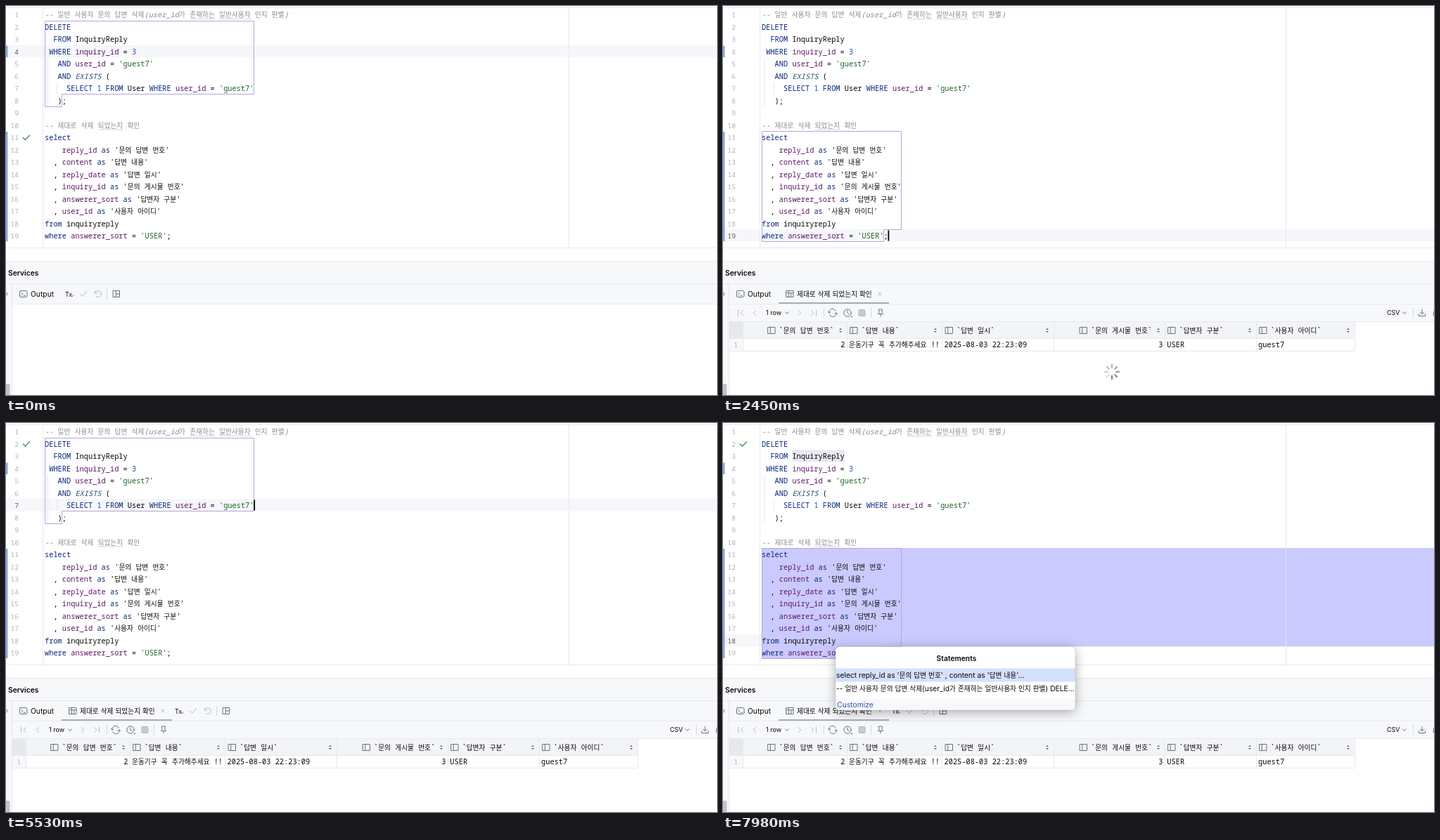
An HTML page for the animation above (8000 ms loop, 1011 by 554 pixels).

```html
<!DOCTYPE html>
<html lang="ko">
<head>
<meta charset="utf-8">
<title>SQL console</title>
<style>
html, body { margin: 0; width: 100%; height: 100%; overflow: hidden; background: #fff; }
svg { display: block; width: 1011px; height: 554px; }
text { white-space: pre; fill: #08080a; }
.mono { font: 500 10.33px "Noto Sans Mono", "DejaVu Sans Mono", monospace; }
.ui { font: 10.3px Inter, "Open Sans", sans-serif; }
.bold { font-weight: 600; }
.small { font-size: 9px; }
.h { font: 9.7px "Noto Sans CJK KR", "Noto Sans CJK", sans-serif; }
.num { font-weight: 400; font-size: 9.7px; text-anchor: end; fill: #aeb3c0; }
.num.now { fill: #565a68; }
.end { text-anchor: end; }
.mid { text-anchor: middle; }
.link { fill: #3058ae; }
.kw { fill: #06267c; }
.col { fill: #5e1768; }
.str { fill: #1f6428; }
.lit { fill: #2148bd; }
.fn { fill: #284d66; font-style: italic; }
.com { fill: #8c8c8c; font-style: italic; }
.line { stroke: #e8e9ed; fill: none; }
.panel { fill: #f7f8fa; }
.sel { fill: #cacaff; }
.box { fill: none; stroke: #b4a6d8; }
.typo { stroke: #a9a9ad; stroke-dasharray: 1.2 1.2; }
.icon { fill: none; stroke: #6c707e; stroke-linecap: round; stroke-linejoin: round; }
.off { stroke: #b4b8c2; }
.tick { fill: none; stroke: #4a9a50; stroke-width: 1.5; stroke-linecap: round; stroke-linejoin: round; }
.pop { filter: drop-shadow(0 3px 8px rgba(0, 0, 0, .32)); }
</style>
</head>
<body>
<svg id="stage" viewBox="0 0 1011 554" xmlns="http://www.w3.org/2000/svg"></svg>
<script>
const LOOP = 8000, STEP = 70, ROW = 17.5, CH = 6.2, LEFT = 55;
const USER = "guest7";

const sql = [
  "-- 일반 사용자 문의 답변 삭제(user_id가 존재하는 일반사용자 인지 판별)",
  "DELETE",
  "  FROM InquiryReply",
  " WHERE inquiry_id = 3",
  `   AND user_id = '${USER}'`,
  "   AND EXISTS (",
  `     SELECT 1 FROM User WHERE user_id = '${USER}'`,
  "   );",
  "",
  "-- 제대로 삭제 되었는지 확인",
  "select",
  "    reply_id as '문의 답변 번호'",
  "  , content as '답변 내용'",
  "  , reply_date as '답변 일시'",
  "  , inquiry_id as '문의 게시물 번호'",
  "  , answerer_sort as '답변자 구분'",
  "  , user_id as '사용자 아이디'",
  "from inquiryreply",
  "where answerer_sort = 'USER';"
];

const midY = n => 12.5 + ROW * (n - 1);
const topY = n => Math.floor(midY(n) - ROW / 2);
const endY = n => Math.floor(midY(n) + ROW / 2 - .5);
const hangul = s => s.replace(/[가-힣]+/g, m => `<tspan class="h">${m}</tspan>`);
const text = (x, y, s, cls) => `<text x="${x}" y="${y}" class="${cls}">${hangul(s)}</text>`;
const rect = (x, y, w, h, attr) => `<rect x="${x}" y="${y}" width="${w}" height="${h}" ${attr}/>`;
const path = (d, cls = "icon", attr = "") => `<path d="${d}" class="${cls}" ${attr}/>`;
const at = (x, y, s) => `<g transform="translate(${x} ${y})">${s}</g>`;
// "a-b c-d" lists the times in ms during which the group is visible
const during = (spans, s) => `<g data-on="${spans}">${s}</g>`;

function paint(line) {
  const rules = [
    ["com", "--.*"], ["str", "'\\w+'"], ["fn", "EXISTS"],
    ["kw", "\\b(?:delete|from|where|and|select|as)\\b"],
    ["col", "\\b(?:[a-z]+_(?:id|date|sort)|content)\\b"], ["lit", "\\b\\d\\b"]
  ];
  const all = new RegExp(rules.map(r => `(${r[1]})`).join("|"), "gi");
  return line.replace(all, (m, ...g) =>
    `<tspan class="${rules[rules.findIndex((r, i) => g[i])][0]}">${m}</tspan>`);
}

// Statement outlines: first row, last row, right edge, right edge of the last row
const outlines = [[2, 8, 352.5, 79.5], [11, 19, 253.5, 228.5]];
function outline([a, b, right, foot]) {
  return path(`M55.5 ${topY(a) + .5}H${right}V${endY(b - 1) + .5}H${foot}V${endY(b) + .5}H55.5Z`, "box");
}
function selection([a, b, , foot]) {
  return path(`M${LEFT} ${topY(a)}H1011V${endY(b - 1) + .3}H${foot}V${endY(b) + .5}H${LEFT}Z`, "sel");
}

const tick = n => path(`M24.3 ${midY(n)}l3.2 3.1l6-6.4`, "tick");
const caret = (n, col) => rect(LEFT + col * CH - .3, topY(n) + 1.5, 1.8, 15, 'fill="#000"');

function editor() {
  const ident = (n, col) => rect(LEFT + col * CH, topY(n) + .5, 12 * CH, 16.5, 'fill="#e9e8f4"');
  const typos = [[262, 298, 18.5], [304, 349, 18.5], [131, 167, 176]];
  return rect(0, 0, 1011, 17.5, 'id="row" fill="#f5f7fa"')
    + during("7140-8000", ident(3, 7) + ident(18, 5))
    + during("4900-5460", selection(outlines[0]))
    + during("1820-2380 7910-8000", selection(outlines[1]))
    + path("M0 2.5H1011M52.5 3V344M800.5 3V344M0 344.5H1011", "line")
    + path("M59.5 74V143M72.5 108.5V125.5", "line")
    + rect(0, 56.5, 2.5, 16.5, 'fill="#87a6e6"')
    + rect(0, 179, 2.5, 156, 'fill="#87a6e6"')
    + typos.map(([a, b, y]) => path(`M${a} ${y}H${b}`, "typo")).join("")
    + sql.map((s, i) =>
        text(18, midY(i + 1) + 3.6, String(i + 1), "mono num")
        + `<text x="${LEFT}" y="${midY(i + 1) + 3.6}" class="mono">${hangul(paint(s))}</text>`).join("")
    + during("0-1540 4620-7560", outline(outlines[0]))
    + during("1540-4620 7560-8000", outline(outlines[1]))
    + during("0-2380 2590-5460", tick(11))
    + during("5530-8000", tick(2))
    + during("840-1540 2380-2940 3500-3990", caret(19, 29))
    + during("4130-4620 5530-6230", caret(7, 48))
    + during("7070-7560", caret(18, 17))
    + during("6230-7070", `<circle cx="66.3" cy="96" r="4.6" fill="#f5b324"/>`
        + path("M64.6 101.6H68M65.2 103.2H67.4", "icon"));
}

const sheet = "M-5-4.5H5V4.5H-5ZM-5-1.3H5M-1.6-4.5V4.5M1.8-1.3V4.5";
const chevron = "M-2.5-1.2L0 1.3L2.5-1.2";

function txTools() {
  return text(84, 413.5, "Tx", "ui small") + path("M92.5 412.2l1.8 1.8l1.4-2.2")
    + at(110, 410, path("M-4.5 0L-1.3 3.2L4.7-3.6", "icon off"))
    + at(131, 410, path("M-4.5-4V-1H-1.4M-4.2-1.2A4.4 4.4 0 1 1-3 3.4", "icon off"))
    + path("M143.5 403V417", "line", 'style="stroke:#d6d8de"')
    + at(157, 410, path("M-4.5-4.5H4.5V4.5H-4.5ZM-.7-4.5V4.5M-.7 0H4.5"));
}

function spinner() {
  const spokes = [...Array(8).keys()].map(i =>
    path("M0-6V-10", "icon", `transform="rotate(${i * 45})" style="stroke:#85888f;stroke-width:2.4;opacity:${.3 + .1 * ((i + 3) % 8)}"`));
  return at(553, 521, `<g id="spin">${spokes.join("")}</g>`);
}

function results() {
  const edges = [28.5, 176.5, 311.5, 470.5, 628.5, 758.5, 898.5];
  const heads = [[64, "문의 답변 번호"], [181, "답변 내용"], [316.5, "답변 일시"],
    [507.5, "문의 게시물 번호"], [633, "답변자 구분"], [763, "사용자 아이디"]];
  return path("M79 423H236", "", 'stroke="#a9adb8" stroke-width="2"')
    + at(95, 410, path(sheet)) + text(105, 413.6, "제대로 삭제 되었는지 확인", "ui")
    + at(223, 410, path("M-2.3-2.3L2.3 2.3M2.3-2.3L-2.3 2.3", "icon off"))
    + rect(9, 425, 1002, 25, 'class="panel"')
    + at(25, 437, path("M-3.5-4V4M3.5-3.5L0 0L3.5 3.5", "icon off"))
    + at(45, 437, path("M1.8-3.5L-1.7 0L1.8 3.5", "icon off"))
    + text(61, 440.3, "1 row", "ui small") + at(91, 437, path(chevron))
    + at(109, 437, path("M-1.8-3.5L1.7 0L-1.8 3.5", "icon off"))
    + at(129, 437, path("M3.5-4V4M-3.5-3.5L0 0L-3.5 3.5", "icon off"))
    + path("M143.5 430V444M210.5 430V444M981.5 430V444", "line", 'style="stroke:#d6d8de"')
    + at(156, 437, path("M-5 0A4.7 4.7 0 0 1 4-2.6M5 0A4.7 4.7 0 0 1-4 2.6M-6.5-1.7L-5 .2L-3.1-1.2M6.5 1.7L5-.2L3.1 1.2"))
    + at(177, 437, `<circle r="5.2" class="icon"/>` + path("M0-3V.4L2.3 1.6M5 6H6.3V4.6"))
    + rect(193, 432.5, 9, 9, 'rx="1" fill="#c8cad0" stroke="#b4b7c0"')
    + at(224, 437, path("M-2.5-5H2.5L1.9-.8L3.6 1.6H-3.6L-1.9-.8ZM0 1.6V5"))
    + text(944, 440.3, "CSV", "ui small") + at(969, 437, path(chevron))
    + at(994, 437, path("M0-4.8V1.5M-2.7-1L0 1.7L2.7-1M-4.7 1.5V4.5H4.7V1.5"))
    + path("M1011 434l-1 7")
    + rect(9, 450, 889.5, 23, 'fill="#f3f4f7"') + rect(9, 450, 19.5, 23, 'fill="#e6e8ee"')
    + rect(9, 473, 19.5, 18.5, 'class="panel"')
    + path("M9 449.5H1011M9 473.5H898M9 491.5H898" + edges.map(x => `M${x} 450V491`).join(""), "line")
    + heads.map(([x, s], i) =>
        at(x + 5, 462, path("M-5-4.5H5V4.5H-5ZM-1.7-4.5V4.5"))
        + text(x + 15.5, 465.6, "`" + s + "`", "mono")
        + at(edges[i + 1] - 9.5, 462, `<path d="M-2-.9L0-3.2L2-.9ZM-2 .9L0 3.2L2 .9Z" fill="#6c707e"/>`)).join("")
    + text(21, 486.3, "1", "mono num") + text(173.5, 486.3, "2", "mono end")
    + text(179, 486.3, "운동기구 꼭 추가해주세요 !!", "mono")
    + text(314.5, 486.3, "2025-08-03 22:23:09", "mono")
    + text(625.5, 486.3, "3", "mono end") + text(631.3, 486.3, "USER", "mono")
    + text(761, 486.3, USER, "mono");
}

function services() {
  return rect(0, 363, 1011, 61, 'class="panel"') + rect(0, 424, 8, 130, 'class="panel"')
    + path("M0 363.5H1011M0 395.5H1011M8.5 396V554M9 424.5H1011", "line")
    + rect(-2, 538, 7.5, 18, 'rx="2" fill="#c2c3c7"')
    + text(3, 383.7, "Services", "ui bold")
    + path("M0 407.5L2.3 410L0 412.5")
    + rect(19.5, 405.5, 10.5, 9, 'rx="1.5" class="icon"') + path("M21.8 408L23.8 410L21.8 412M25 412.3H27.6")
    + text(35, 413.7, "Output", "ui")
    + during("0-2450", txTools())
    + during("2590-8000", at(156, 0, txTools()))
    + during("2450-8000", results())
    + during("2450-2940", spinner());
}

function popup(x, y, items, chosen) {
  const foot = 37 + 19 * items.length, h = foot + 15.5;
  return at(x, y, rect(0, 0, 341, h, 'rx="6" fill="#fff" class="pop"')
    + rect(0, 31 + 19 * chosen, 341, 19, 'fill="#d3e1fd"')
    + path(`M0 ${foot}H341V${h - 6}Q341 ${h} 335 ${h}H6Q0 ${h} 0 ${h - 6}Z`, "panel")
    + text(172, 20, "Statements", "ui bold mid")
    + items.map((s, i) => text(1, 44.5 + 19 * i, s, "ui")).join("")
    + text(2.3, foot + 11.5, "Customize", "ui link")
    + rect(0, 0, 341, h, 'rx="6" fill="none" stroke="#000" stroke-opacity=".13" stroke-width=".7"'));
}

const pick = "select reply_id as '문의 답변 번호' , content as '답변 내용'...";
const whole = "-- 일반 사용자 문의 답변 삭제(user_id가 존재하는 일반사용자 인지 판별) DELE...";
const popups = during("1820-2380", popup(234.7, 336, [pick, whole], 0))
  + during("4900-5460", popup(352.3, 126, [`SELECT 1 FROM User WHERE user_id = '${USER}'`,
      "DELETE FROM InquiryReply WHERE inquiry_id = 3 AND ...", whole], 1))
  + during("7910-8000", popup(160, 318.5, [pick, whole], 0));

const beam = "M-2.8-6.3Q-.3-6.3 0-4.8Q.3-6.3 2.8-6.3M0-4.8V4.8M-2.8 6.3Q-.3 6.3 0 4.8Q.3 6.3 2.8 6.3M-1.5 1.2H1.5";
const pointer = `<g id="mouse"><g id="beam">`
  + path(beam, "", 'fill="none" stroke="#fff" stroke-width="2.6"')
  + path(beam, "", 'fill="none" stroke="#111" stroke-width="1.2"')
  + `</g><path id="arrow" d="M0 0V14L3.2 11L5.6 16.3L7.9 15.3L5.6 10.2H10Z" fill="#000" stroke="#fff"/></g>`;

const $ = id => document.getElementById(id);
$("stage").innerHTML = editor() + services() + popups + pointer;

const timed = [...document.querySelectorAll("[data-on]")].map(el =>
  [el, el.dataset.on.split(" ").map(s => s.split("-").map(Number))]);
const numbers = [...document.querySelectorAll(".num")].slice(0, sql.length);

// Each move: start, arrival, hidden again, then start, control and end points
const moves = [
  [70, 560, 1820, [497, 519], [410, 400], [371, 339]],
  [3500, 4200, 4900, [408, 322], [475, 235], [425, 121]],
  [6230, 6930, 7910, [422, 125], [400, 250], [347, 315]]
];

function moveMouse(t) {
  const move = moves.find(m => t >= m[0] && t < m[2]);
  $("mouse").style.display = move ? "" : "none";
  if (!move) return;
  const [from, to, , a, b, c] = move;
  const p = Math.min(1, (t - from) / (to - from)), k = p * p * (3 - 2 * p), q = 1 - k;
  const nudge = t >= 7000 ? Math.min(8, (t - 6930) / 17.5) : 0;
  const [x, y] = a.map((v, i) => q * q * v + 2 * q * k * b[i] + k * k * c[i]);
  $("mouse").setAttribute("transform", `translate(${x + nudge} ${y - nudge / 4})`);
  $("beam").style.display = y < 344 ? "" : "none";
  $("arrow").style.display = y < 344 ? "none" : "";
}

function draw(t) {
  for (const [el, spans] of timed)
    el.style.display = spans.some(([a, b]) => t >= a && t < b) ? "" : "none";
  const line = t < 840 ? 4 : t < 4130 ? 19 : t < 7070 ? 7 : 18;
  $("row").setAttribute("y", topY(line));
  numbers.forEach((el, i) => el.classList.toggle("now", i + 1 === line));
  $("spin").setAttribute("transform", `rotate(${45 * Math.floor((t - 2450) / 125)})`);
  moveMouse(t);
}

const start = performance.now();
function frame() {
  const t = (performance.now() - start) % LOOP;
  draw(Math.floor(t / STEP) * STEP);
  requestAnimationFrame(frame);
}
frame();
</script>
</body>
</html>
```
